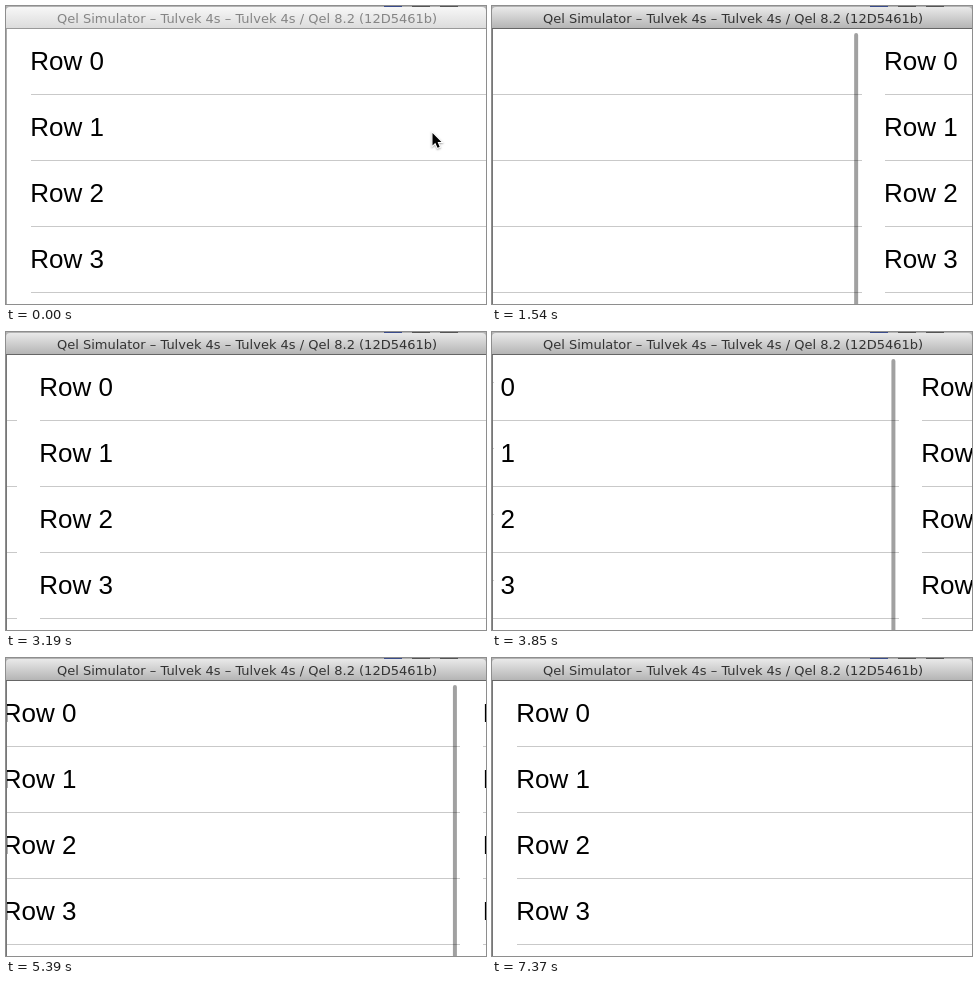
Animation of 480 by 298 pixels, one loop 7700 ms. Source, as an HTML page with a canvas:

```html
<!DOCTYPE html>
<html lang="en">
<head>
<meta charset="utf-8">
<title>Endless list pager</title>
<style>
html, body { margin: 0; width: 100%; height: 100%; overflow: hidden; background: #fff; }
canvas { display: block; }
</style>
</head>
<body>
<canvas id="stage" width="480" height="298"></canvas>
<script>
const ctx = document.getElementById('stage').getContext('2d');
const WIDTH = 480, HEIGHT = 298, LOOP = 7700, STEP = 110;
const TITLE = 'Qel Simulator – Tulvek 4s – Tulvek 4s / Qel 8.2 (12D5461b)';

// Each swipe pulls in one page from the left; x, y is where the pointer grabs
const swipes = [
  { start: 425, duration: 1800, x: 156, y: 171 },
  { start: 2230, duration: 800, x: 150, y: 200 },
  { start: 3103, duration: 1100, x: 130, y: 310 },
  { start: 4528, duration: 1100, x: 129, y: 211 },
  { start: 5874, duration: 548, x: 200, y: 200 }
];
const APPROACH = 400;

const clamp = v => Math.max(0, Math.min(1, v));
const mix = (a, b, k) => a + (b - a) * k;

function swiped(swipe, t) {
  const u = clamp((t - swipe.start) / swipe.duration);
  return WIDTH * (1 - (1 - u * u) ** 3);
}

// Approach each grab point, then drag to the right and upwards off the window
function pointerAt(t) {
  let x = 426.5, y = 127;
  for (const swipe of swipes) {
    const near = (t - swipe.start + APPROACH) / APPROACH;
    if (near < 0) break;
    const k = clamp(near) ** 3, moved = swiped(swipe, t);
    x = mix(x, swipe.x, k) + moved;
    y = mix(y, swipe.y, k) - moved / 2;
  }
  return [x, y];
}

function rect(color, x, y, w, h) {
  ctx.fillStyle = color;
  ctx.fillRect(x, y, w, h);
}

function roundRect(color, ...shape) {
  ctx.fillStyle = color;
  ctx.beginPath();
  ctx.roundRect(...shape);
  ctx.fill();
}

function drawScrollBar(swipe, x, t) {
  const shown = clamp((swiped(swipe, t) - 60) / 100);
  const faded = clamp((t - swipe.start - swipe.duration - 180) / 770);
  roundRect(`rgba(0,0,0,${0.37 * shown * (1 - faded)})`, x + 474.5, 27, 4, HEIGHT, 2);
}

function drawPage(x) {
  ctx.font = '26px "Liberation Sans", Arial, sans-serif';
  ctx.textAlign = 'left';
  for (let row = 0; row < 4; row++) {
    const y = 66 * row;
    rect('#c9c9c9', Math.round(x + 25), y + 88, WIDTH - 23, 1);
    ctx.fillStyle = '#000';
    ctx.fillText('Row ' + row, x + 24.3, y + 64.3);
  }
}

function drawWindow(active) {
  const shade = ctx.createLinearGradient(0, 1, 0, 22);
  shade.addColorStop(0, active ? '#e9e9e9' : '#f7f7f7');
  shade.addColorStop(1, active ? '#b5b5b5' : '#dcdcdc');
  rect('#b4b4b4', 0, 0, WIDTH, 5);
  for (let i = 0; i < 3; i++) rect(i ? '#555' : '#3a4c8c', 378 + 28 * i, 0, 18, 1);
  roundRect(shade, 0, 1, WIDTH, 21, [4, 4, 0, 0]);
  rect(active ? '#666' : '#999', 0, 22, WIDTH, 1);
  rect(active ? '#777' : '#aaa', 0, 23, 1, HEIGHT);
  ctx.font = '13px "DejaVu Sans", sans-serif';
  ctx.textAlign = 'center';
  ctx.fillStyle = active ? '#333' : '#858585';
  ctx.fillText(TITLE, 241, 17);
}

const arrow = new Path2D('M0 0V12.4L2.8 9.8L5 14.8L7.2 13.9L5.1 9H8.9Z');

function drawPointer(x, y) {
  ctx.save();
  ctx.translate(x, y);
  ctx.shadowColor = 'rgba(0,0,0,.35)';
  ctx.shadowBlur = 2;
  ctx.shadowOffsetY = 1;
  ctx.strokeStyle = '#fff';
  ctx.lineWidth = 2;
  ctx.stroke(arrow);
  ctx.shadowColor = 'transparent';
  ctx.fillStyle = '#000';
  ctx.fill(arrow);
  ctx.restore();
}

function draw(now) {
  const t = Math.floor(now % LOOP / STEP) * STEP;
  const scroll = swipes.reduce((sum, swipe) => sum + swiped(swipe, t), 0);
  rect('#fff', 0, 0, WIDTH, HEIGHT);
  for (let page = 0; page <= swipes.length; page++) {
    const x = scroll - page * WIDTH;
    if (Math.abs(x) >= WIDTH) continue;
    drawPage(x);
    if (page) drawScrollBar(swipes[page - 1], x, t);
  }
  drawWindow(t >= swipes[0].start);
  drawPointer(...pointerAt(t));
}

const start = performance.now();
function tick() {
  draw(performance.now() - start);
  requestAnimationFrame(tick);
}
tick();
</script>
</body>
</html>
```
